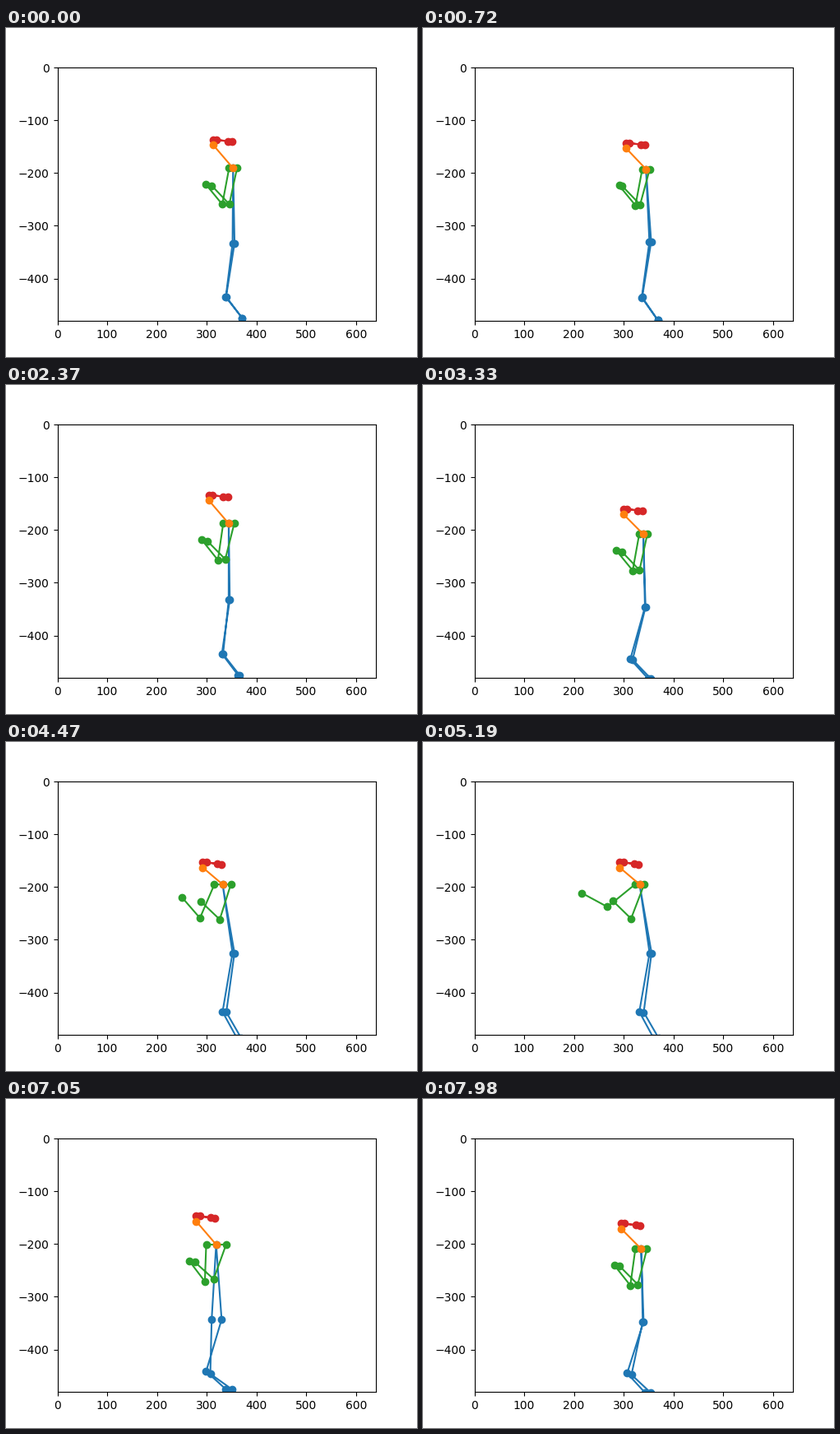
Animation of 500x400 px, one loop 8 s. Source, as a matplotlib script:

```python
import numpy as np
import matplotlib.pyplot as plt
from matplotlib.animation import FuncAnimation

LOOP, TICK, STEP = 8000, 20, 30           # ms
PERIOD, FIRST_HIT, SNAP = 760, 590, 75    # punching rhythm, ms
HALF_TURN = 7000                          # ms for the body to turn fully

# neck xy, hip xy, foot xy, nose height, sway share, shoulder width, leg stretch
HIT = np.array([332, -195, 354, -325, 365, -486, 32, 0, 1, 1.1])
UP = np.array([336, -196, 337, -338, 358, -475, 44, 1, 1, 1])
DIP = np.array([339, -208, 343, -346, 352, -482, 38, 0.25, 0.6, 1])
CYCLE = [(0, HIT), (0.1, HIT), (0.22, UP), (0.5, UP),
         (0.6, DIP), (0.75, DIP), (1, HIT)]

THIGH, SHIN, UPPER_ARM, FOREARM = 103, 52, 70, 50
GUARD = np.array([[-54, -31], [-43, -33]])   # wrists from the neck
PUNCH = np.array([-140, -11])
NOSE_X = -40
FACE = np.array([[29, 7], [0, 10], [7, 10], [38, 6]])   # ear, eyes, ear


def stance_at(phase):
    for (p0, a), (p1, b) in zip(CYCLE, CYCLE[1:]):
        if phase <= p1:
            u = (phase - p0) / (p1 - p0)
            return a + (b - a) * u * u * (3 - 2 * u)


def joint(root, tip, a, b, side):
    """Bend point of a two-bone limb; side picks the way it bends."""
    d = tip - root
    dist = np.hypot(*d)
    along = (a * a - b * b + dist * dist) / (2 * dist)
    out = np.sqrt(max(a * a - along * along, 0))
    d = d / dist
    return root + d * along + side * out * np.array([-d[1], d[0]])


def pose_at(t):
    beat = (t - FIRST_HIT) / PERIOD
    phase, k = beat % 1, round(beat)
    s = stance_at(phase)
    neck, hip, foot = s[:6].reshape(3, 2)
    nose_y, share, width, stretch = s[6:]

    # slow drift to the left while the body turns
    sway = np.cos(np.pi * t / HALF_TURN)
    turn = (1 - sway) / 2
    drift = np.array([17, 5]) * sway * share
    hop = 6 * max(0, np.sin(np.pi * (phase - 0.22) / 0.28)) * (phase < 0.5)
    neck = neck + drift + [0, hop]
    hip = hip + drift + [0, hop / 2]
    foot = foot + [drift[0] * 0.8, 0]

    # the arms take turns
    ext = np.exp(-((beat - k) * PERIOD / SNAP) ** 2)
    arm = (k + 1) % 2
    half = (8 + 12 * turn) * width * (1 - 2 * ext * arm)

    legs, arms = [], []
    for i, sign in enumerate((-1, 1)):
        h = hip + [sign * (2 - 12 * turn * share), 0]
        f = foot + [sign * 6 * turn, 0]
        knee = joint(h, f, THIGH * stretch, SHIN * stretch, -1)
        legs.append([f, knee, h])

        e = ext if i == arm else 0
        shoulder = neck + [sign * half, 0]
        wrist = neck + GUARD[i] + (PUNCH - GUARD[i]) * e
        elbow = joint(shoulder, wrist, UPPER_ARM, FOREARM + 10 * e, 1)
        arms.append([wrist, elbow, shoulder])

    nose = neck + [NOSE_X, nose_y]
    return (legs[0] + [neck] + legs[1][::-1], arms[0] + arms[1][::-1],
            nose + FACE, [nose, neck])


fig, ax = plt.subplots(figsize=(5, 4), dpi=100)
ax.set_xlim(0, 640)
ax.set_ylim(-480, 0)
lines = [ax.plot([], [], "o-", color=c)[0] for c in ("C0", "C2", "C3", "C1")]


def draw(i):
    t = (i * TICK + TICK // 2) // STEP * STEP
    for line, points in zip(lines, pose_at(t)):
        line.set_data(*np.array(points).T)
    return lines


anim = FuncAnimation(fig, draw, frames=LOOP // TICK, interval=TICK,
                     repeat=True, repeat_delay=0, blit=False)
plt.show()
```
